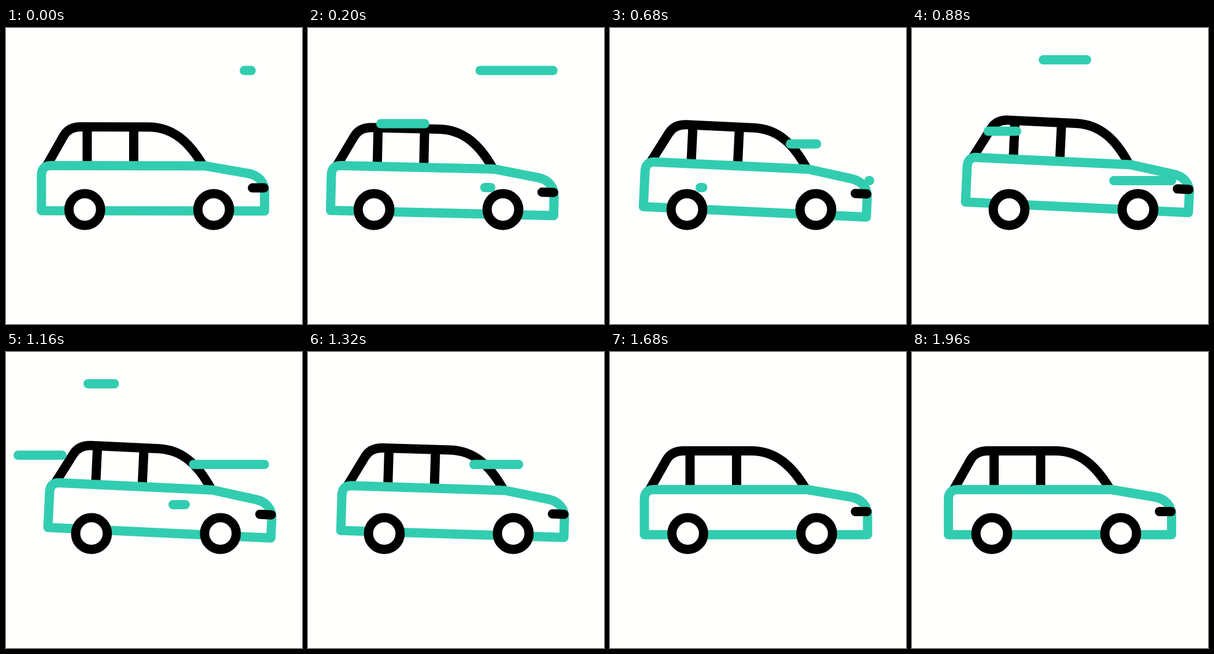
Animation of 512x512 px, one loop 2 s. Source, as an HTML page with a canvas:

```html
<!DOCTYPE html>
<html lang="en">
<head>
<meta charset="utf-8">
<title>Car</title>
<style>
  html, body { margin: 0; width: 100%; height: 100%; overflow: hidden; background: #fffffd; }
  canvas { display: block; width: 100vw; height: 100vh; object-fit: contain; }
</style>
</head>
<body>
<canvas id="stage" width="512" height="512"></canvas>
<script>
const ctx = document.getElementById('stage').getContext('2d');
const PAPER = '#fffffd', GREEN = '#32cdb0', BLACK = '#000';
const LOOP = 2000, STEP = 40, WEIGHT = 16;

// Every speed line runs alike, 160 px to the left; only its start and place differ.
const RUN = 160;
const LINES = [
  { start: -62, x: 424, y: 73.5 },
  { start: 20, x: 202, y: 165.5 },
  { start: 143, x: 316, y: 276 },
  { start: 222, x: 472, y: 200.5 },
  { start: 663, x: 449, y: 264 },
  { start: 702, x: 302, y: 55 },
  { start: 743, x: 181, y: 178.5 },
  { start: 905, x: 447, y: 194.5 }
];

const roof = new Path2D('M71 240 L101 187 Q110 171 131 171 H248 C290 171 318 197 341 235');
const pillars = new Path2D('M142 171 V236 M222.5 171 V236');
const body = new Path2D('M63 316 V255 Q63 238 79 238 H345 L421 251 C438 254 449 266 449 282 V316 Z');
const lamp = new Path2D('M428 276 H448');

// Eased progress from 0 to 1
function ramp(t, start, span) {
  const s = Math.min(1, Math.max(0, (t - start) / span));
  return s * s * (3 - 2 * s);
}

function stroke(path, color) {
  ctx.strokeStyle = color;
  ctx.lineWidth = WEIGHT;
  ctx.stroke(path);
}

// The car falls back, surges ahead, drifts back and settles.
function pose(t) {
  const fall = ramp(t, -60, 530);
  const drift = ramp(t, 860, 645);
  return {
    x: -49 * fall + 79 * ramp(t, 470, 390) - 45 * drift
      + 18 * ramp(t, 1505, 295) - 3 * ramp(t, 1800, 160),
    lift: 8.3 * fall - 14.5 * ramp(t, 480, 440) + 6.2 * drift,
    tilt: 2.7 * (fall - ramp(t, 1160, 403)) * Math.PI / 180
  };
}

function drawWheel(x) {
  const rim = new Path2D();
  rim.arc(x, 314, 27.4, 0, Math.PI * 2);
  ctx.fillStyle = PAPER;
  ctx.fill(rim);
  stroke(rim, BLACK);
}

function drawCar(t) {
  const { x, lift, tilt } = pose(t);
  ctx.save();
  ctx.translate(x, 0);

  ctx.save();
  ctx.translate(256, 305 + lift);
  ctx.rotate(tilt);
  ctx.translate(-256, -305);
  ctx.lineCap = 'butt';
  stroke(roof, BLACK);
  stroke(pillars, BLACK);
  stroke(body, GREEN);
  ctx.lineCap = 'round';
  stroke(lamp, BLACK);
  ctx.restore();

  drawWheel(138);
  drawWheel(361);
  ctx.restore();
}

function drawLine(t, { start, x, y }) {
  const age = t - start;
  const head = ramp(age, 0, 372), tail = ramp(age, 255, 313);
  if (head <= tail || tail > 0.999) return;
  const path = new Path2D();
  path.moveTo(x - tail * RUN, y);
  path.lineTo(x - head * RUN, y);
  ctx.lineCap = 'round';
  stroke(path, GREEN);
}

function draw(t) {
  ctx.fillStyle = PAPER;
  ctx.fillRect(0, 0, 512, 512);
  ctx.lineJoin = 'round';
  drawCar(t);
  for (const line of LINES) drawLine(t, line);
}

const begin = performance.now();
function tick() {
  const t = (performance.now() - begin) % LOOP;
  draw(Math.floor(t / STEP) * STEP);
  requestAnimationFrame(tick);
}
tick();
</script>
</body>
</html>
```
